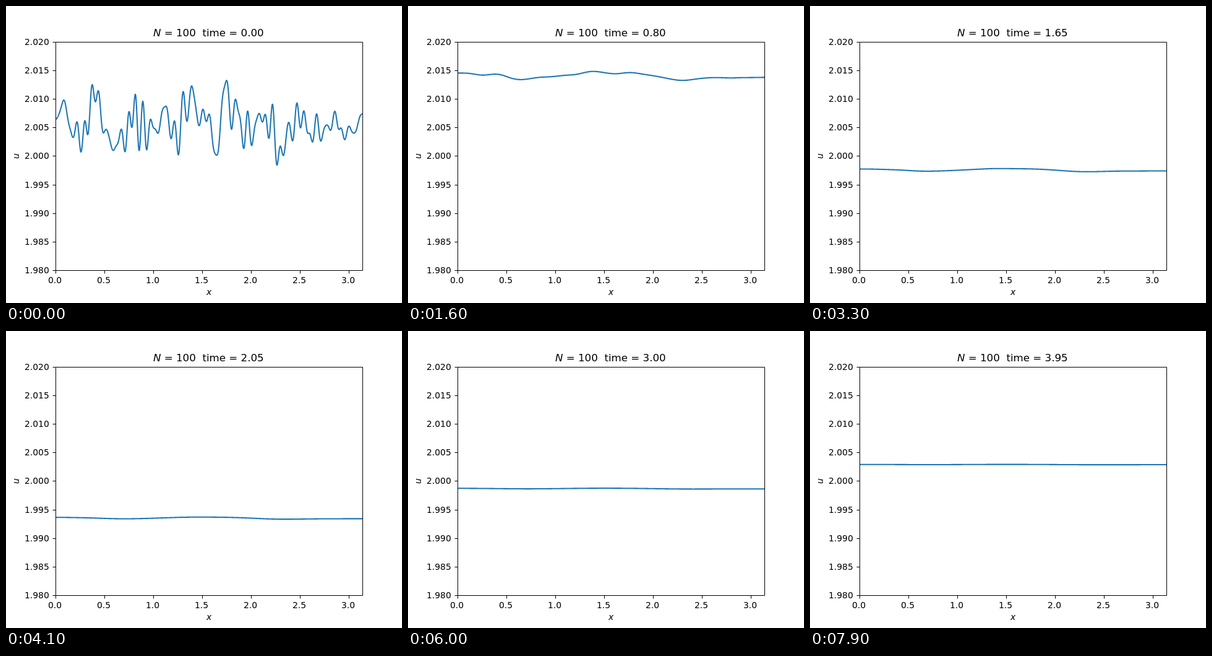
Recreate the animation shown at these times as an HTML page. Size 640 by 480 pixels, loop 8000 ms.

```html
<!DOCTYPE html>
<html lang="en">
<head>
<meta charset="utf-8">
<title>Damped wave plot</title>
<style>
  html, body { margin: 0; width: 100%; height: 100%; overflow: hidden; background: #fff; }
  svg { display: block; width: 640px; height: 480px; }
  text { font: 13.889px "DejaVu Sans", sans-serif; white-space: pre; }
  .title { font-size: 16.667px; }
  .var { font-style: italic; }
  .axis { fill: none; stroke: #000; }
  #curve { fill: none; stroke: #1f77b4; stroke-width: 2.083; stroke-linejoin: round; stroke-linecap: square; }
</style>
</head>
<body>
<svg viewBox="0 0 640 480">
  <clipPath id="area"><rect x="80" y="57.6" width="496" height="369.6"/></clipPath>
  <g clip-path="url(#area)"><path id="curve"/></g>
  <path id="ticks" class="axis"/>
  <path class="axis" d="M80.5 58.5H576.5V427.5H80.5Z"/>
  <g id="labels"></g>
  <text class="title" x="238" y="49"><tspan class="var">N</tspan> = 100  time = <tspan id="clock">0.00</tspan></text>
  <text class="var" x="328" y="467" text-anchor="middle">x</text>
  <text class="var" transform="translate(21 247) rotate(-90)">u</text>
</svg>
<script>
const LEFT = 80, WIDTH = 496, ZERO = 242.4, PX_PER_U = 9240;
const LOOP = 8000, STEP = 100, DT = 0.05;
const MODES = 100, COARSE = 20;   // modes below COARSE form the lasting profile
const SETTLED = 0.8;              // time at which the profile has its listed size
const byId = id => document.getElementById(id);

// Key points of the profile: x, and u above 2.01 in units of 1e-5
const profile = [
  [0, 455], [0.27, 420], [0.41, 427], [0.64, 332], [0.8, 370], [1.13, 411], [1.38, 478], [1.6, 443],
  [1.8, 455], [2.1, 380], [2.25, 322], [2.65, 373], [2.77, 365], [2.88, 370], [Math.PI, 375]];

// Eased height of the profile at x, in pixels
function profileAt(x) {
  const i = profile.findIndex(p => p[0] >= x);
  const [x0, u0] = profile[Math.max(0, i - 1)], [x1, u1] = profile[i];
  const ease = (1 - Math.cos(Math.PI * (x - x0) / (x1 - x0))) / 2;
  return (u0 + (u1 - u0) * ease) * PX_PER_U * 1e-5;
}

function profileMode(k) {
  const n = 400;
  let sum = 0;
  for (let j = 0; j < n; j++) {
    const x = Math.PI * (j + 0.5) / n;
    sum += profileAt(x) * Math.cos(k * x);
  }
  return 2 * sum / n;
}

let seed = 2024;
function random() {
  seed = seed * 16807 % 2147483647;
  return seed / 2147483647;
}

// Size of each cosine mode: a smooth profile below, random noise above
const size = Array.from({ length: MODES }, (_, k) =>
  k === 0 ? 0 : k < COARSE ? profileMode(k) : (random() - 0.5) * 6.8 * Math.SQRT2);

function modeAt(k, t) {
  return k < COARSE
    ? size[k] * Math.exp(-(0.85 + 0.012 * k * k) * (t - SETTLED))
    : size[k] * Math.exp(-(0.9 + 0.006 * k * k) * t);
}

// Mean height in pixels above u = 2: a damped oscillation
function mean(t) {
  const d = t - 1.508;
  return -92.2 * Math.exp(-0.51 * d) * Math.sin(1.91 * d);
}

function curvePath(t) {
  const amps = size.map((_, k) => modeAt(k, t));
  const base = ZERO - mean(t), points = [];
  for (let px = 0; px <= WIDTH; px += 0.5) {
    const x = Math.PI * px / WIDTH;
    const y = amps.reduce((sum, a, k) => sum - a * Math.cos(k * x), base);
    points.push((LEFT + px) + " " + y.toFixed(2));
  }
  return "M" + points.join("L");
}

function drawAxes() {
  let ticks = "", labels = "";
  const label = (x, y, value) => { labels += `<text x="${x}" y="${y}">${value}</text>`; };
  for (let i = 0; i < 7; i++) {
    const x = LEFT + i * 0.5 * WIDTH / Math.PI;
    ticks += `M${Math.round(x) + 0.5} 427.5v5`;
    label(Math.floor(x - 11.05), 448, (i / 2).toFixed(1));
  }
  for (let i = 0; i < 9; i++) {
    const y = 57.6 + i * 46.2;
    ticks += `M80.5 ${Math.round(y) + 0.5}h-5`;
    label(30, Math.round(y + 5), (2.02 - i * 0.005).toFixed(3));
  }
  byId("ticks").setAttribute("d", ticks);
  byId("labels").innerHTML = labels;
}

let shown = -1;
function tick() {
  const step = Math.floor(performance.now() % LOOP / STEP);
  if (step !== shown) {
    shown = step;
    byId("curve").setAttribute("d", curvePath(step * DT));
    byId("clock").textContent = (step * DT).toFixed(2);
  }
  requestAnimationFrame(tick);
}

drawAxes();
tick();
</script>
</body>
</html>
```
